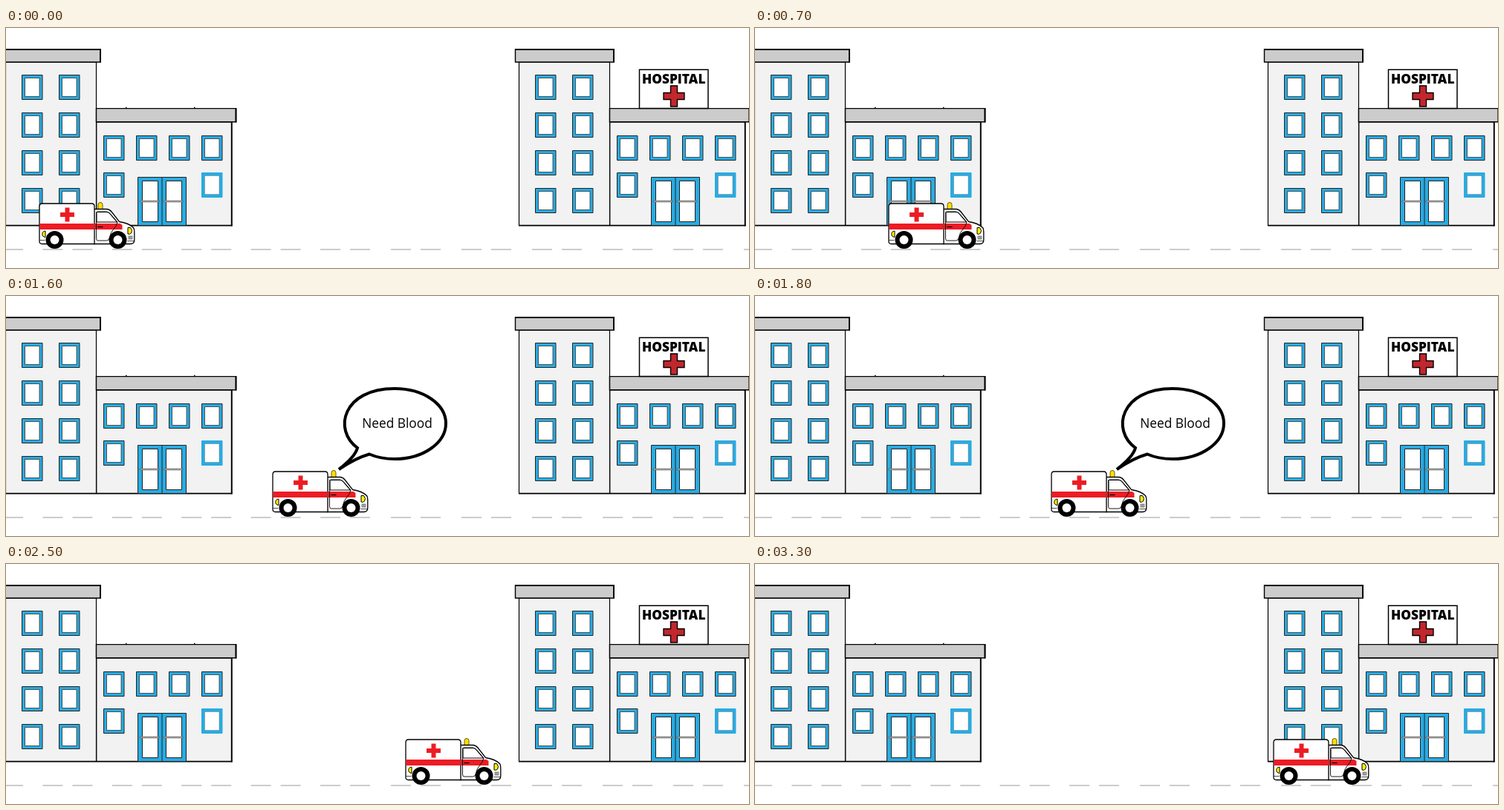
Animation of 1000x324 px, one loop 3.4 s. Source, as an HTML page with a canvas:

```html
<!DOCTYPE html>
<html lang="en">
<head>
<meta charset="utf-8">
<title>Ambulance</title>
<style>
html, body { margin: 0; width: 100%; height: 100%; overflow: hidden; background: #fff; }
canvas { display: block; }
</style>
</head>
<body>
<canvas id="stage" width="1000" height="324"></canvas>
<script>
const ctx = document.getElementById('stage').getContext('2d');
const STEP = 100, STEPS = 34;
const BLUE = '#29abe2', RED = '#ed1c24', YELLOW = '#fff200';
const FONT = '"Open Sans", "Noto Sans", sans-serif';

// [step, left edge of the ambulance]
const DRIVE = [[0, 45], [6, 161], [7, 180], [12, 278], [16, 359], [21, 459], [25, 538], [33, 698]];

function driveX(n) {
  const i = Math.max(1, DRIVE.findIndex(k => k[0] >= n));
  const [a, xa] = DRIVE[i - 1], [b, xb] = DRIVE[i];
  return Math.round(xa + (xb - xa) * (n - a) / (b - a));
}

function paint(fill, stroke, width) {
  if (fill) { ctx.fillStyle = fill; ctx.fill(); }
  if (stroke) { ctx.strokeStyle = stroke; ctx.lineWidth = width; ctx.stroke(); }
}

function box(x, y, w, h, fill, stroke, width = 1) {
  ctx.beginPath();
  ctx.rect(x, y, w, h);
  paint(fill, stroke, width);
}

function line(x1, y1, x2, y2, color = '#000', width = 1) {
  ctx.beginPath();
  ctx.moveTo(x1, y1);
  ctx.lineTo(x2, y2);
  paint(null, color, width);
}

function circle(x, y, r, fill) {
  ctx.beginPath();
  ctx.arc(x, y, r, 0, 2 * Math.PI);
  paint(fill);
}

function shape(d, fill, stroke, width = 1) {
  const p = new Path2D(d);
  if (fill) { ctx.fillStyle = fill; ctx.fill(p); }
  if (stroke) { ctx.strokeStyle = stroke; ctx.lineWidth = width; ctx.stroke(p); }
}

function cross(x, y, size, bar, fill, stroke, width) {
  const s = size / 2, b = bar / 2, arm = s - b;
  shape(`M${x - b} ${y - s}h${bar}v${arm}h${arm}v${bar}h${-arm}v${arm}h${-bar}v${-arm}h${-arm}v${-bar}h${arm}z`,
    fill, stroke, width);
}

function text(str, x, y, font) {
  ctx.font = font;
  ctx.textAlign = 'center';
  ctx.fillStyle = '#000';
  ctx.fillText(str, x, y);
}

function at(x, y, draw) {
  ctx.save();
  ctx.translate(x, y);
  draw();
  ctx.restore();
}

function pane(x, y, outlined = true) {
  box(x + .5, y + .5, 27.5, 33, BLUE, outlined ? '#222' : BLUE);
  box(x + 4.5, y + 4.5, 19.5, 25, '#fff', outlined ? '#333' : '#777', outlined ? .8 : .5);
}

function building() {
  box(-.5, 46, 122, 220.5, '#f2f2f2', '#000', 1.2);
  box(121.8, 127, 182, 139.5, '#f2f2f2', '#000', 1.2);
  line(303.7, 127, 303.7, 267.5, '#000', 1.8);
  line(-1, 266.7, 304.5, 266.7, '#000', 1.8);
  box(-5.5, 29, 132.5, 17, '#ccc', '#000', 1.4);
  line(-6, 29, 127.5, 29, '#000', 2);
  line(127, 28, 127, 46.5, '#000', 2);
  box(121.5, 108.6, 188, 18.2, '#ccc', '#000', 1.4);
  line(309.5, 108, 309.5, 127.5, '#000', 2);

  for (const y of [63, 114, 165, 216]) {
    pane(21, y);
    pane(71, y);
  }
  for (const x of [131, 175, 219, 263]) pane(x, 145);
  pane(131, 195);
  pane(263, 195, false);

  box(177.5, 201.5, 65, 65, BLUE, '#222');
  line(210, 201, 210, 267, '#222');
  for (const x of [183.5, 215.5]) {
    box(x, 206.5, 21, 55, '#fff', '#222');
    line(x - 4, 234, x + 23, 234, '#666', 2.6);
    line(x - 3, 234, x + 22, 234, '#aaa', 1.2);
  }
}

function sign() {
  box(852.5, 56.3, 92.5, 52.3, '#fff', '#000', 1.5);
  text('HOSPITAL', 898.7, 75, `800 17.3px ${FONT}`);
  cross(899, 92, 28, 9, '#c1272d', '#000', 1.4);
}

// Dashes come in pairs
function road() {
  for (let i = -5; i < 7; i++) {
    const x = 423 + i * (i < 0 ? 93.4 : 95);
    line(x, 299, x + 27, 299, '#999');
    line(x + 40, 299, x + 67, 299, '#999');
  }
}

function wheel(x) {
  circle(x, 50, 12, '#000');
  circle(x, 50, 6, '#fff');
}

function ambulance() {
  // Beacon
  shape('M79.5 9.5V2.5q0-3 3-3t3 3v7z', '#ffe000', '#5a4a00', .9);
  // Cab
  shape('M74 8.5H91Q94.5 8.5 97.5 12L108 25.5Q121 27.5 127 33.5Q128.3 35 128.3 39V50Q128.3 55.5 123 55.5H74Z',
    '#fff', '#000', 1.3);
  // Box
  shape('M4 1H71Q74.5 1 74.5 5V55.5H4Q.5 55.5.5 52V5Q.5 1 4 1Z', '#fff', '#000', 1.3);
  box(1, 28, 73, 8, RED);
  shape('M75 28H109L112 30V36H75Z', RED);
  cross(38, 16, 19, 6, RED);

  // Door and window
  shape('M77 48V14Q77 12 79 12H91Q94 12 97 16L105.5 26Q104 32 100 36Q96 40 95 47Q94 51 91 51H79Q77 51 77 48',
    null, '#000', .9);
  shape('M77.5 12.5H91Q93.5 12.5 95.5 15L105 26H77.5Z', '#fff', '#000', 1.1);
  line(79, 32.5, 86, 32.5, '#000', 1.2);

  // Lamps, grille and bumpers
  shape('M8.5 38A5 4.3 0 0 0 8.5 46.5Z', YELLOW, '#000', 1);
  shape('M119.5 33.5H123Q126.5 37.5 124 41Q122 43 119.5 42Z', YELLOW, '#000', 1);
  box(120, 44.5, 6, 5, '#888');
  line(120, 47, 126, 47, '#ccc', .7);
  line(1, 50.5, 8, 50.5, '#000', .7);
  line(119, 51.5, 128, 51.5, '#000', .7);

  wheel(21);
  wheel(106);
}

function bubble() {
  shape('M473 205C440 181 453 125 523 125C562 125 592 146 592 172C592 198 562 220 523 220' +
    'Q504 220 489 213.5Q470 219 448 234Q470 217 473 205Z', '#fff', '#000', 4);
  text('Need Blood', 526.5, 178, `17.3px ${FONT}`);
}

function render(n) {
  ctx.fillStyle = '#fff';
  ctx.fillRect(0, 0, 1000, 324);
  at(0, 0, building);
  line(161, 107.8, 162.5, 107.8, '#000', 2);
  line(253, 107.8, 254.5, 107.8, '#000', 2);
  at(691, 0, building);
  sign();
  road();
  if (n >= 13 && n <= 20) at(Math.round((n - 16) * 19.4), 0, bubble);
  at(driveX(n) - .5, 236, ambulance);
}

const start = performance.now();

function tick() {
  const time = Math.max(0, performance.now() - start);
  render(Math.floor(time / STEP) % STEPS);
  requestAnimationFrame(tick);
}
tick();
</script>
</body>
</html>
```
